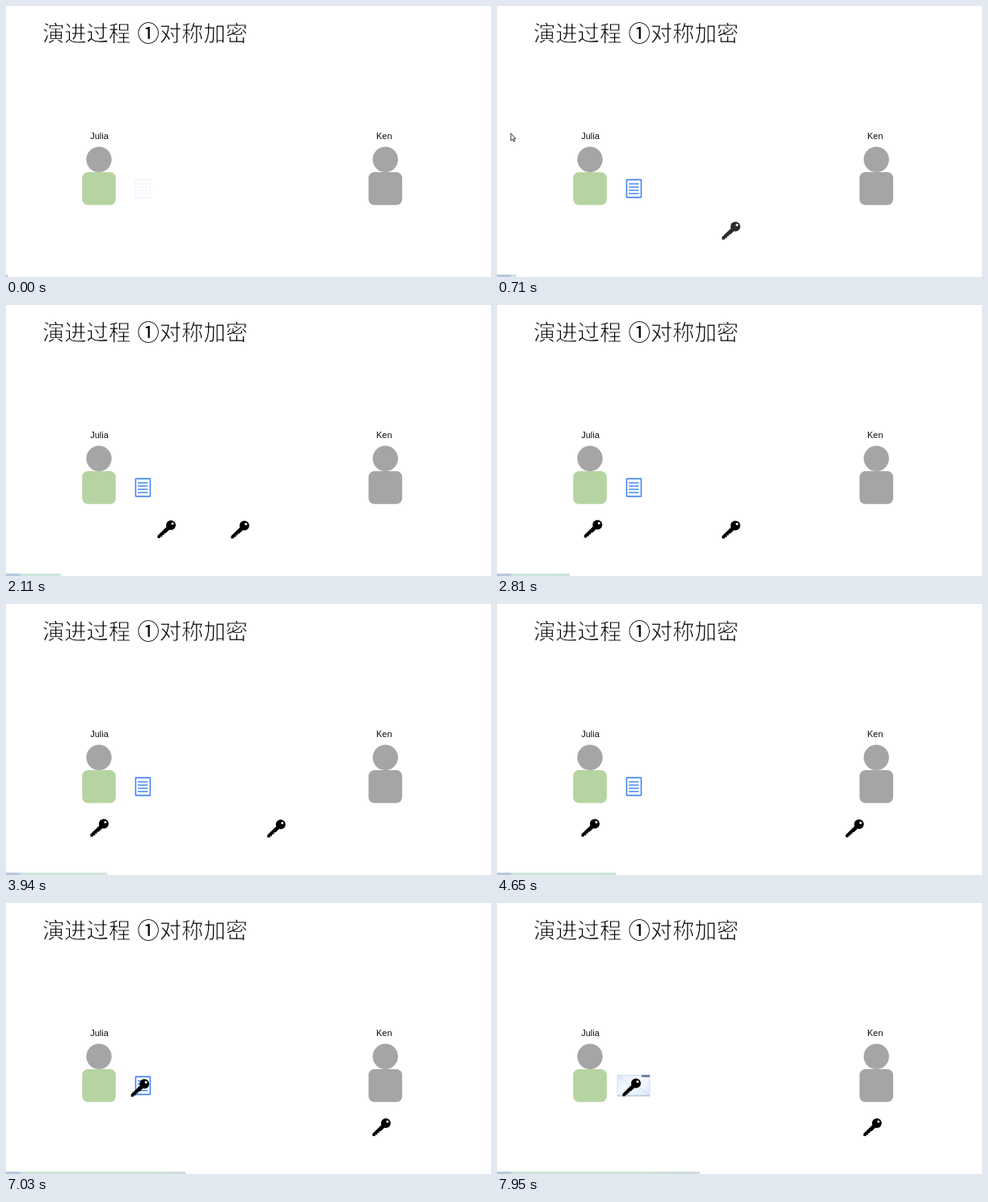
Recreate the animation shown at these times as an HTML page. Size 600x336 px, loop 8 s.

```html
<!DOCTYPE html>
<html lang="zh">
<head>
<meta charset="utf-8">
<title>对称加密</title>
<style>
html, body { margin: 0; width: 100%; height: 100%; overflow: hidden; background: #fff; }
svg { display: block; width: 600px; height: 336px; }
/* The white outline thins the strokes to a light weight. */
.title { font: 300 27.3px "Noto Sans CJK SC", "Noto Sans CJK", "Noto Sans CJK JP", sans-serif; fill: #000; stroke: #fff; stroke-width: .75; }
.digit { stroke: none; }
.name { font: 11px "Liberation Sans", Arial, sans-serif; text-anchor: middle; fill: #111; }
</style>
</head>
<body>
<svg viewBox="0 0 600 336">
  <defs>
    <g id="key">
      <circle cx="16.9" cy="6.5" r="6"/>
      <path d="M11.6 8.6 L0.4 19.6 L0.4 22.6 L3.6 22.6 L4.2 20.6 L6.2 20.9 L6.5 18.5 L8.6 18.6 L8.8 16.5 L10.8 16.2 L15 12.2 Z"/>
      <circle cx="18.9" cy="4.6" r="1.5" fill="#fff"/>
    </g>
    <g id="person">
      <circle cx="115" cy="190.3" r="15.7" fill="#a5a5a5"/>
      <rect x="94.2" y="206.1" width="41.6" height="40.7" rx="7"/>
    </g>
    <linearGradient id="barFill" gradientUnits="userSpaceOnUse" x1="0" x2="251" y1="0" y2="0">
      <stop offset="0" stop-color="#b5c8da"/>
      <stop offset=".065" stop-color="#bac7de"/>
      <stop offset=".075" stop-color="#cde6dc"/>
      <stop offset=".5" stop-color="#cfe3d6"/>
      <stop offset="1" stop-color="#cfdcd8"/>
    </linearGradient>
    <linearGradient id="paper" x1="0" y1="0" x2="1" y2="1">
      <stop offset="0" stop-color="#dfeaf8"/>
      <stop offset=".5" stop-color="#f8fbff"/>
      <stop offset="1" stop-color="#d8e6f6"/>
    </linearGradient>
  </defs>

  <text class="title" x="45" y="43.7">演进过程</text>
  <text class="title" x="162.5" y="43.7"><tspan class="digit">①</tspan><tspan>对称加密</tspan></text>

  <text class="name" x="115.5" y="165.2">Julia</text>
  <text class="name" x="467.8" y="165.2">Ken</text>
  <use href="#person" fill="#b6d4a1"/>
  <use href="#person" x="354.3" fill="#a5a5a5"/>

  <g id="doc" fill="none" stroke="#4285f4">
    <rect x="160.4" y="215.4" width="18" height="22" rx=".6" stroke-width="1.6"/>
    <path d="M163 220.5h12.4M163 224.5h12.4M163 228.5h12.4M163 232.5h12.4" stroke-width="1.5"/>
  </g>

  <g id="envelope">
    <rect x="149" y="213.5" width="40" height="25.5" fill="url(#paper)" stroke="#c6d7ec" stroke-width=".8"/>
    <path d="M149.5 238.5L165 226M188.5 238.5L173 226M149.5 214L169 230L188.5 214" fill="none" stroke="#cbdbef" stroke-width=".9"/>
    <path d="M149 239h40" stroke="#a9bcd2"/>
    <rect x="179" y="213" width="10" height="3" fill="#72869b"/>
  </g>

  <use id="keyB" href="#key"/>
  <use id="keyA" href="#key"/>

  <path id="cursor" d="M0 0v9.2l2.1-1.9 1.5 3 1.4-.7-1.4-2.9h2.4z" fill="#fff" stroke="#222" stroke-width=".9"/>
  <rect id="bar" y="333" height="3" fill="url(#barFill)"/>
</svg>
<script>
const LOOP = 8000, STEP = 70.35, MOVE = 1800;
const el = id => document.getElementById(id);
const [doc, envelope, keyA, keyB, cursor, bar] =
  ['doc', 'envelope', 'keyA', 'keyB', 'cursor', 'bar'].map(el);

// Each route: start point, then [start time, x, y] moves of equal duration.
const routes = [
  { key: keyA, from: [278, 267], moves: [[1190, 104, 266], [5390, 155, 217]] },
  { key: keyB, from: [278, 267], moves: [[3295, 453, 266.5]] }
];

const ramp = (t, start, length) => Math.min(1, Math.max(0, (t - start) / length));
const ease = u => u < .5 ? 2 * u * u : 1 - 2 * (1 - u) ** 2;
const moveTo = (node, x, y) => node.setAttribute('transform', `translate(${x} ${y})`);

function placeKey({ key, from, moves }, t) {
  let [x, y] = from;
  for (const [start, toX, toY] of moves) {
    const p = ease(ramp(t, start, MOVE));
    x += (toX - x) * p;
    y += (toY - y) * p;
  }
  moveTo(key, x, y);
  key.style.opacity = ramp(t, 500, 350);
}

// The pointer sweeps along an arc that flattens to the right.
function placeCursor(t) {
  const p = ease(ramp(t, 650, 630));
  moveTo(cursor, 10 + 492.8 * p, 130 + 187 * p ** .45);
  cursor.style.visibility = t > 630 && t < 1650 ? 'visible' : 'hidden';
}

function draw(time) {
  const t = Math.floor((time % LOOP + 10) / STEP) * STEP;
  routes.forEach(route => placeKey(route, t));
  placeCursor(t);
  doc.style.opacity = ramp(t, -40, 500);
  envelope.style.opacity = ramp(t, 7300, 500);
  bar.setAttribute('width', 2 + t * .0313);
}

const begin = performance.now();
function tick() {
  draw(performance.now() - begin);
  requestAnimationFrame(tick);
}
tick();
</script>
</body>
</html>
```
